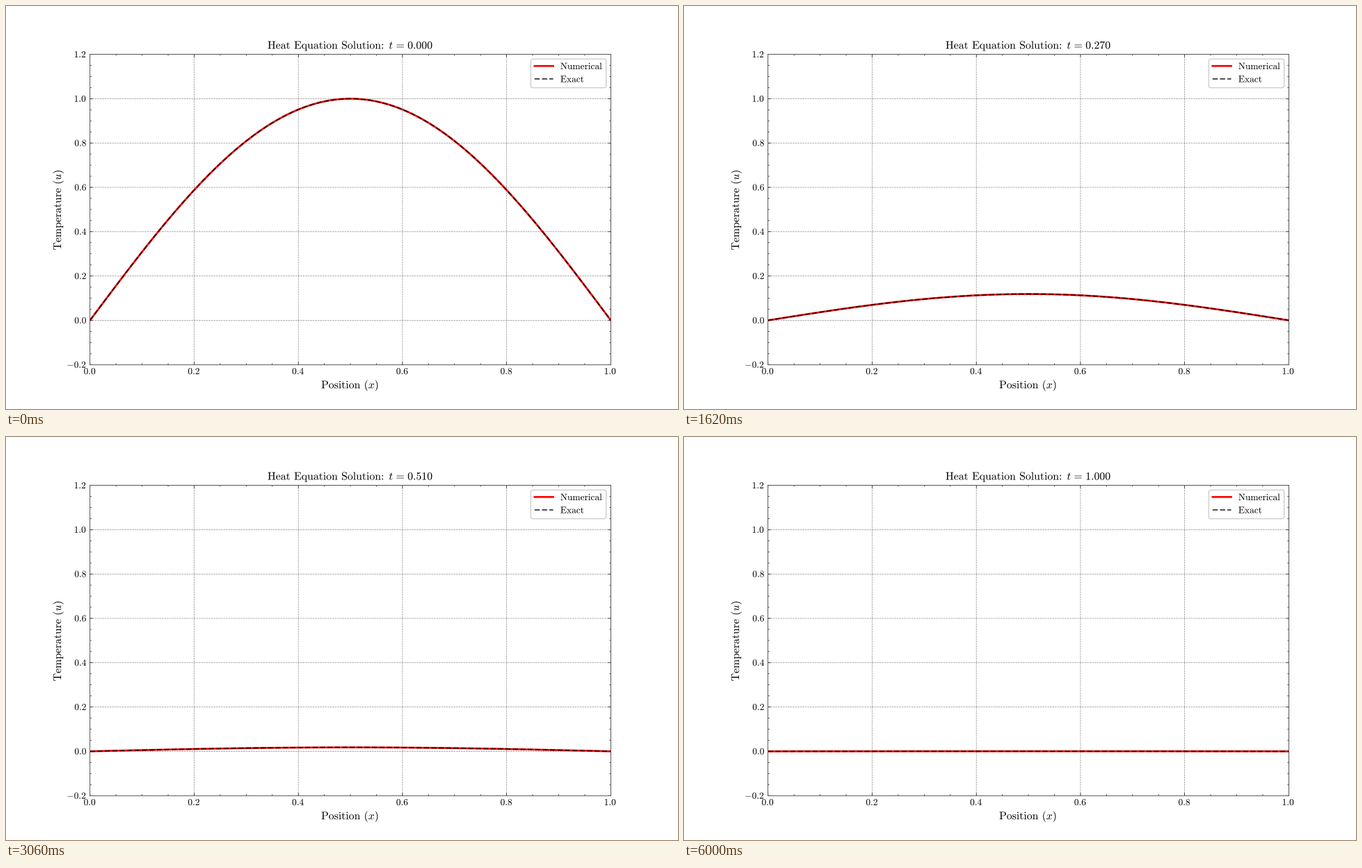
Animation, 966 px wide and 580 px high, one loop 6060 ms. Source, as a matplotlib script:

```python
import numpy as np
import matplotlib.pyplot as plt
from matplotlib.animation import FuncAnimation
from matplotlib.collections import LineCollection
from matplotlib.lines import Line2D
from matplotlib.patches import FancyBboxPatch, PathPatch
from matplotlib.text import Text
from matplotlib.textpath import TextPath, text_to_path
from matplotlib.transforms import Affine2D

W, H, DPI = 966, 580, 96
FRAMES, STEP_MS, DT = 101, 60, 0.01
ALPHA = 0.8                                # thermal diffusivity
PT = 96.6 / 72                             # pixels per design point
SMALL, LARGE = 10 * PT, 12 * 0.98 * PT     # font sizes in pixels
THIN, MEDIUM, FRAME, BOLD = (w * PT * 72 / DPI for w in (0.5, 1.5, 1, 2))
LEFT, RIGHT, TOP, BOTTOM = 0.125 * W, 0.9 * W, 0.12 * H, 0.89 * H
MID_X, MID_Y = (LEFT + RIGHT) / 2, (TOP + BOTTOM) / 2

# smooth sub-pixel lines everywhere
plt.rcParams["mathtext.fontset"] = "cm"
plt.rcParams["path.snap"] = False

fig = plt.figure(figsize=(W / DPI, H / DPI), dpi=DPI, facecolor="white")
ax = fig.add_axes([0.125, 0.11, 0.775, 0.77])

# stage pixels, y pointing down
px = Affine2D().scale(1 / W, -1 / H).translate(0, 1) + fig.transFigure
EM100 = Text(size=100).get_fontproperties()


def roman(text):
    """Upright math text with normal word spaces."""
    return r"\mathrm{" + r"\hspace{0.38}".join(text.split(" ")) + "}"


def outline(x, y, text, size, align=0.5, rotation=0):
    """Text outline on baseline y; its ink starts at the left of its box."""
    text = f"${text}$"
    width = text_to_path.get_text_width_height_descent(text, EM100, True)[0]
    path = TextPath((0, 0), text, size=size)
    shift = path.get_extents().x0 + align * width * size / 100
    place = (Affine2D().translate(-shift, 0).scale(1, -1)
             .rotate_deg(-rotation).translate(x, y))
    return path.transformed(place)


def put(*args, **kwargs):
    return fig.add_artist(PathPatch(outline(*args, **kwargs), transform=px,
                                    fc="black", lw=0, zorder=6))


def title_path(t):
    gap = r"\hspace{0.117}"
    text = (roman("Heat Equation Solution")
            + r"\hspace{-0.2}\mathrm{:}\hspace{0.306}t"
            + gap + "=" + gap + f"{t:.3f}")
    return outline(MID_X, TOP - 6 * PT, text, LARGE)


# axes and grid
ax.set(xlim=(0, 1), ylim=(-0.2, 1.2), xticks=[], yticks=[])
for spine in ax.spines.values():
    spine.set_linewidth(THIN)
grid = dict(color="black", alpha=0.5, lw=THIN, ls="--", zorder=0.5)
for k in range(1, 5):
    ax.axvline(k / 5, **grid)
for k in range(6):
    ax.axhline(k / 5, **grid)

# inward ticks on all four sides, every fourth one long
ticks = []
for k in range(21):
    x, size = LEFT + (RIGHT - LEFT) * k / 20, (1.5 if k % 4 else 3) * PT
    ticks += [[(x, BOTTOM), (x, BOTTOM - size)], [(x, TOP), (x, TOP + size)]]
    if k % 4 == 0:
        put(x, 529.9, f"{k / 20:.1f}", SMALL)
for k in range(29):
    y, size = BOTTOM - (BOTTOM - TOP) * k / 28, (1.5 if k % 4 else 3) * PT
    ticks += [[(LEFT, y), (LEFT + size, y)], [(RIGHT, y), (RIGHT - size, y)]]
    if k % 4 == 0:
        put(LEFT - 3.5 * PT, y + 4.35, f"{k / 20 - 0.2:.1f}".replace("-0.0", "0.0"),
            SMALL, align=1)
ax.add_collection(LineCollection(ticks, transform=px, colors="black",
                                 lw=THIN, zorder=0.6), autolim=False)

put(MID_X, 550.2, roman("Position (") + r"x\mathrm{)}", LARGE)
put(79.1, MID_Y, roman("Temperature (") + r"u\mathrm{)}", LARGE, rotation=90)
title = fig.add_artist(PathPatch(title_path(0), transform=px, fc="black", lw=0))

# curves
numeric_style = dict(color="red", lw=BOLD)
exact_style = dict(color="black", lw=MEDIUM, ls="--", alpha=0.7)
xs = np.linspace(0, 1, 101)
numeric, = ax.plot([], [], **numeric_style)
exact, = ax.plot([], [], **exact_style)

# legend
fig.add_artist(FancyBboxPatch(
    (754.4, 76.3), 108.3, 41.3, boxstyle="round,pad=0,rounding_size=2.68",
    transform=px, fc="white", ec="0.8", lw=FRAME, zorder=5))
rows = [("Numerical", 91.0, numeric_style), ("Exact", 109.6, exact_style)]
for name, base, style in rows:
    fig.add_artist(Line2D([759.8, 786.6], [base - 4.7] * 2, transform=px,
                          zorder=6, **style))
    put(797.3, base, roman(name), SMALL, align=0)


def update(i):
    t = i * DT
    u = np.exp(-ALPHA * np.pi ** 2 * t) * np.sin(np.pi * xs)
    numeric.set_data(xs, u)
    exact.set_data(xs, u)
    title.set_path(title_path(t))
    return numeric, exact, title


anim = FuncAnimation(fig, update, frames=FRAMES, interval=STEP_MS,
                     init_func=lambda: update(0), repeat=True, repeat_delay=0,
                     blit=False)
plt.show()
```
